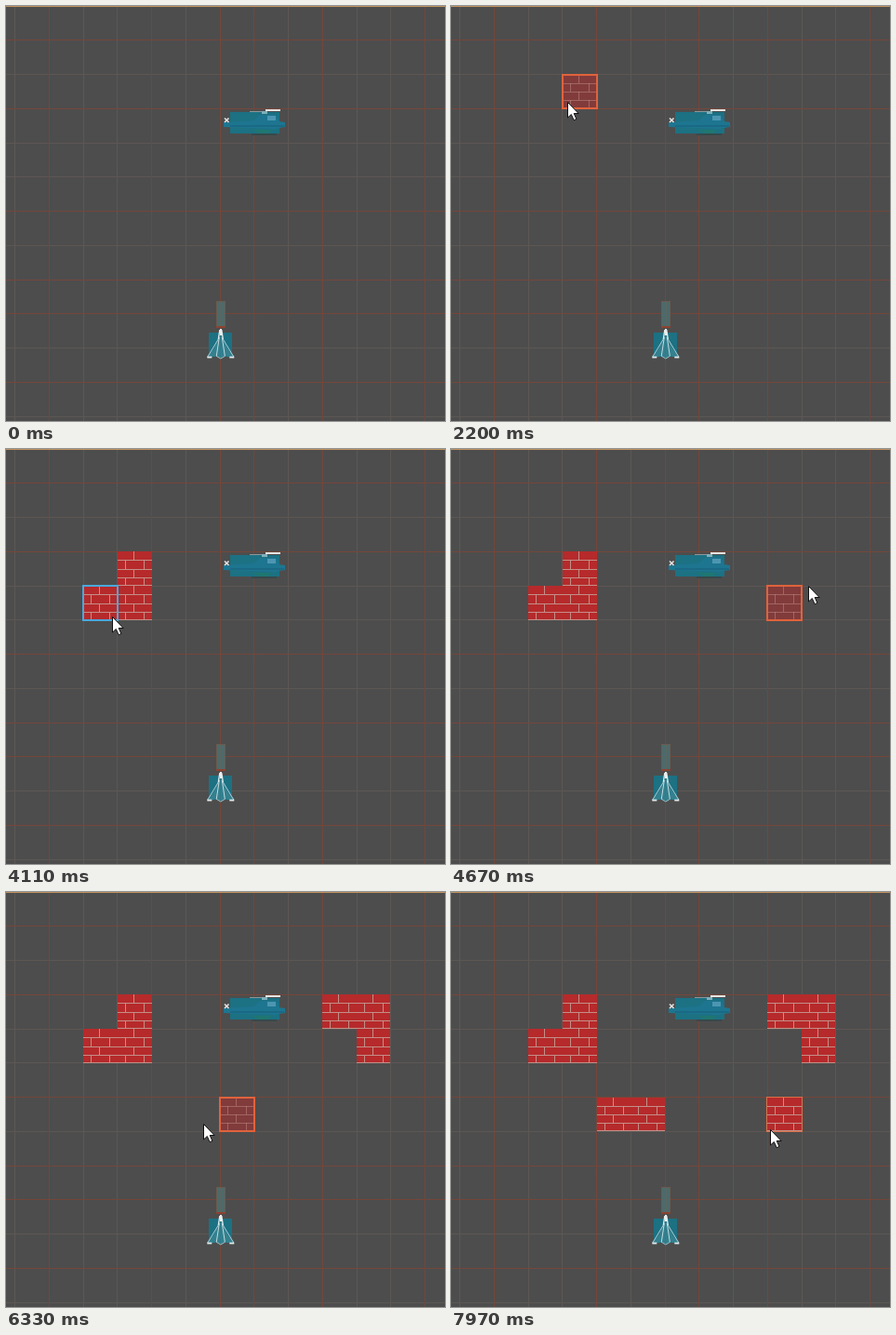
Recreate the animation shown at these times as an HTML page with a canvas. Size 472x446 px, loop 8 s.

```html
<!DOCTYPE html>
<html lang="en">
<head>
<meta charset="utf-8">
<title>Level editor: placing bricks</title>
<style>
html, body { margin: 0; width: 100%; height: 100%; overflow: hidden; background: #4d4d4d; }
canvas { display: block; }
</style>
</head>
<body>
<canvas id="stage" width="472" height="446"></canvas>
<script>
const W = 472, H = 446, LOOP = 8000;
const ENTER = 480, STEP = 78, TRAVEL = 320, SELECT_DELAY = 380;
const ctx = document.getElementById('stage').getContext('2d');

const colX = c => Math.round(9.75 + 36.7 * c);
const rowY = r => Math.round(36.75 * r);
const cellAt = ({ x, y }) => ({ c: Math.floor((x - 9.75) / 36.7), r: Math.floor(y / 36.75) });

// Pointer stops: arrival time, x, y, and whether a brick is dropped there.
const DROP = true;
const stops = [
  [ENTER, 30, 436], [940, 108, 250], [1260, 139, 236], [1420, 145, 215], [1500, 146, 251],
  [1970, 138, 115], [2110, 132, 96], [2190, 125, 103], [2360, 109, 125], [2600, 135, 130, DROP],
  [2920, 146, 141], [3400, 138, 165, DROP], [3720, 114, 180, DROP], [4430, 371, 165],
  [4750, 392, 135], [5230, 372, 135, DROP], [5390, 376, 138], [5550, 395, 132, DROP],
  [5780, 396, 163, DROP], [6330, 212, 249], [6480, 138, 246], [6720, 163, 247],
  [6870, 180, 241], [7020, 182, 240, DROP], [7260, 208, 239], [7420, 210, 240, DROP],
  [7660, 345, 253], [7890, 343, 255, DROP]
].map(([t, x, y, drop]) => ({ t, x, y, drop }));

const bricks = stops.filter(s => s.drop).map(s => ({ t: s.t, ...cellAt(s) }));

// Each trip eases into its stop; the pointer rests in between.
function pointer(t) {
  const i = stops.findIndex(s => s.t >= t);
  if (i < 0) return stops[stops.length - 1];
  if (i === 0) return stops[0];
  const a = stops[i - 1], b = stops[i];
  const begin = Math.max(a.t, b.t - TRAVEL);
  const u = Math.max(0, (t - begin) / (b.t - begin));
  const e = u * u * (3 - 2 * u);
  return { x: Math.round(a.x + (b.x - a.x) * e), y: Math.round(a.y + (b.y - a.y) * e) };
}

function rect(x, y, w, h, color) {
  ctx.fillStyle = color;
  ctx.fillRect(x, y, w, h);
}

function shape(points, fill, stroke, width = 1) {
  ctx.beginPath();
  points.forEach(([x, y]) => ctx.lineTo(x, y));
  ctx.closePath();
  if (fill) { ctx.fillStyle = fill; ctx.fill(); }
  if (stroke) { ctx.strokeStyle = stroke; ctx.lineWidth = width; ctx.stroke(); }
}

function line(x1, y1, x2, y2, color, width = 1) {
  ctx.beginPath();
  ctx.moveTo(x1, y1);
  ctx.lineTo(x2, y2);
  ctx.strokeStyle = color;
  ctx.lineWidth = width;
  ctx.stroke();
}

function drawGrid() {
  rect(0, 0, W, H, '#4d4d4d');
  const redCols = [1, 4, 6, 7, 9, 12], redRows = [1, 3, 6, 8, 9, 11];
  for (const red of [false, true]) {
    const color = red ? '#75463a' : '#5d5754';
    for (let i = 0; i <= 12; i++) {
      if (redCols.includes(i) === red) rect(Math.floor(9.5 + 36.75 * i), 0, 1, H, color);
      if (i && redRows.includes(i) === red) rect(0, Math.floor(36.75 * i), W, 1, color);
    }
  }
  rect(0, 0, W, 1, '#c0925f');
}

function drawHelicopter() {
  rect(262, 113, 18, 1, '#8b9799');
  rect(241, 114, 53, 23, '#1c7183');
  rect(264, 137, 27, 2, '#37494b');
  shape([[234, 125], [266, 123], [273, 117], [290, 117], [294, 124], [300, 125],
    [300, 130], [288, 132], [234, 130]], '#1d7590');
  rect(241, 128, 58, 2, '#1a6985');
  shape([[264, 133], [286, 133], [282, 137], [272, 137]], '#1f7672');
  rect(281, 118, 9, 5, '#4d96b2');
  rect(275, 113, 6, 3, '#7eafbb');
  rect(279, 111, 16, 2, '#e2e5e4');
  line(235, 120.5, 239.5, 125, '#e4e4e4', 1.6);
  line(239.5, 120.5, 235, 125, '#e4e4e4', 1.6);
}

function drawShip() {
  rect(226, 317, 10, 28, '#6b5a4e');
  rect(227, 318, 8, 26, '#4c6a6b');
  rect(230, 318, 2, 26, '#5b6662');
  rect(226, 344, 10, 2, '#8b4331');
  rect(218, 351, 25, 26, '#1c7183');
  const half = [[0.5, 347], [2.5, 358], [8, 369], [14.5, 376], [13.5, 378.5], [5, 376], [0, 379]];
  for (const side of [-1, 1]) {
    const at = (dx, y) => [230.8 + side * dx, y];
    shape([at(0, 347), ...half.map(p => at(...p))], '#34808f');
    line(...at(1, 348), ...at(2.5, 358), '#e6eff0', 1.3);
    line(...at(2.5, 358), ...at(14, 377), '#a9ccd4');
    line(...at(1.5, 356), ...at(4.5, 376), '#c3dce1');
    line(...at(9.5, 377.5), ...at(14.5, 377.5), '#e6e9e8', 1.8);
    line(...at(5, 376), ...at(0, 379), '#9fb9bf');
  }
  rect(230, 347, 2, 7, '#e8eeee');
}

function drawBrick({ c, r }, alpha) {
  const x = colX(c), y = rowY(r), w = colX(c + 1) - x, h = rowY(r + 1) - y;
  const mortar = '#c48f87', course = h / 4;
  ctx.globalAlpha = alpha;
  rect(x, y, w, h, '#b62a2b');
  for (let k = 0; k < 4; k++) {
    const top = Math.round(k * course), bottom = Math.min(h - 1, Math.round((k + 1) * course));
    rect(x, y + bottom, w, 1, mortar);
    for (let j = k % 2 ? 8 : 17; j < w; j += 20) rect(x + j, y + top, 1, bottom - top, mortar);
  }
  ctx.globalAlpha = 1;
}

function outline({ c, r }, color, width) {
  const x = colX(c), y = rowY(r), off = width % 2 / 2;
  ctx.strokeStyle = color;
  ctx.lineWidth = width;
  ctx.strokeRect(x - off, y - off, colX(c + 1) - x + 2 * off, rowY(r + 1) - y + 2 * off);
}

function drawCursor({ x, y }) {
  const arrow = [[0, 0], [0, 16.5], [3.8, 13], [6.6, 19.2], [9.4, 18], [6.7, 12], [11.6, 12]];
  shape(arrow.map(([dx, dy]) => [x + 0.5 + dx, y + 0.5 + dy]), '#fff', '#111', 1);
}

function draw(t) {
  drawGrid();
  drawHelicopter();
  drawShip();
  const done = bricks.filter(b => t >= b.t);
  done.forEach(b => drawBrick(b, 1));
  if (t < ENTER) return;
  // The picture advances in steps, and the preview trails the pointer by one.
  const held = ENTER + STEP * Math.floor((t - ENTER + 16) / STEP);
  const cell = cellAt(pointer(held - STEP));
  const under = done.find(b => b.c === cell.c && b.r === cell.r);
  if (!under) {
    drawBrick(cell, 0.5);
    outline(cell, '#e0623c', 2);
  } else if (t - under.t > SELECT_DELAY) {
    outline(cell, '#4aa8dc', 2);
  } else {
    outline(cell, '#dc7048', 1);
  }
  drawCursor(pointer(held));
}

const start = performance.now();
function tick(now) {
  draw(Math.max(0, now - start) % LOOP);
  requestAnimationFrame(tick);
}
draw(0);
requestAnimationFrame(tick);
</script>
</body>
</html>
```
